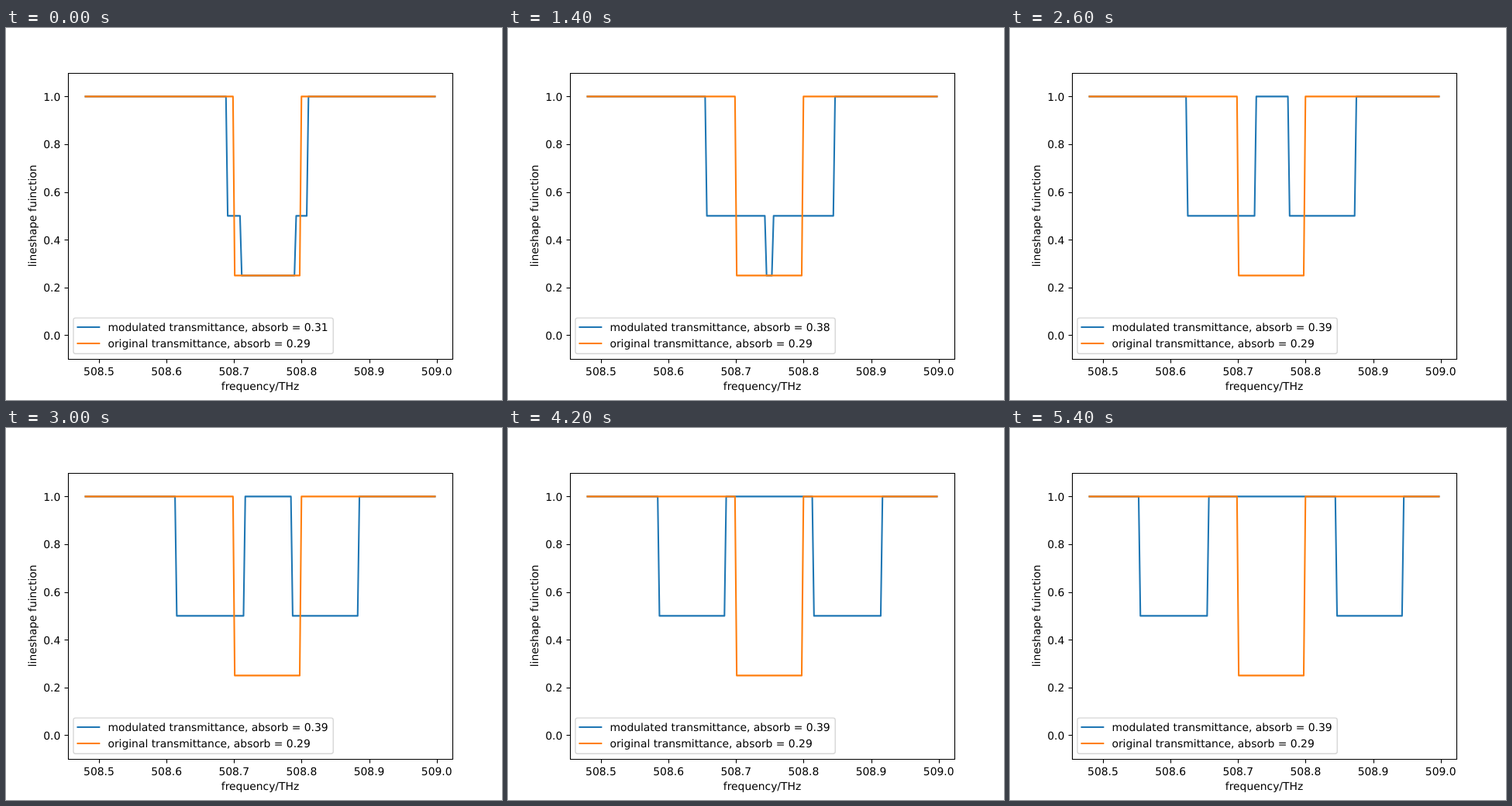
These frames come from a looping animation (640x480 px, 5600 ms). An HTML page:

```html
<!DOCTYPE html>
<html lang="en">
<head>
<meta charset="utf-8">
<title>Modulated transmittance</title>
<style>
  html, body { margin: 0; width: 100%; height: 100%; overflow: hidden; background: #fff; }
  svg { display: block; }
  text { font: 13.889px "DejaVu Sans", sans-serif; fill: #000; text-rendering: geometricPrecision; white-space: pre; }
  .axis { fill: none; stroke: #000; stroke-width: 1.111; }
  .curve { fill: none; stroke-width: 2.083; stroke-linecap: square; stroke-linejoin: round; }
</style>
</head>
<body>
<svg id="plot" width="640" height="480" viewBox="0 0 640 480"></svg>
<script>
const SVG_NS = "http://www.w3.org/2000/svg";
const plot = document.getElementById("plot");
const BLUE = "#1f77b4", ORANGE = "#ff7f0e";

// Sampled frequency axis: 200 points, 0.0026 THz apart
const POINTS = 200, STEP = 0.0026, START = 508.48;
const LEFT = 102.545, DX = 450.909 / (POINTS - 1);
const BAND_START = 84.42, BAND_END = 122.885;
const FRAME_MS = 200, FRAMES = 28;

const xOf = freq => LEFT + (freq - START) / STEP * DX;
const yOf = value => 396.4 - 308 * value;

function add(tag, attrs, content = "") {
  const node = document.createElementNS(SVG_NS, tag);
  for (const key in attrs) node.setAttribute(key, attrs[key]);
  node.textContent = content;
  return plot.appendChild(node);
}

const label = (x, y, content, anchor = "middle", extra = {}) =>
  add("text", { x, y, "text-anchor": anchor, ...extra }, content);
const curve = (stroke, d = "") => add("path", { class: "curve", stroke, d });
const axis = d => add("path", { class: "axis", d });

// Absorption at every sample, from two half-strength bands moved apart by `shift` samples
function absorption(shift) {
  const inBand = i => i >= BAND_START && i <= BAND_END;
  return Array.from({ length: POINTS }, (_, i) => {
    const hits = inBand(i + shift) + inBand(i - shift);
    return [0, 0.5, 0.75][hits];
  });
}

const pathOf = values => "M" + values
  .map((v, i) => `${(LEFT + i * DX).toFixed(2)} ${yOf(1 - v).toFixed(2)}`)
  .join("L");

const caption = (name, values) => {
  const percent = Math.round(values.reduce((sum, v) => sum + v, 0));
  return `${name} transmittance, absorb = ${(percent / 100).toFixed(2)}`;
};

const still = absorption(0);
const movingCurve = curve(BLUE);
curve(ORANGE, pathOf(still));

axis("M80.5 58.5H576.5V427.5H80.5Z");
for (let k = 0; k < 6; k++) {
  const freq = 508.5 + k / 10, x = xOf(freq);
  axis(`M${Math.round(x) + 0.5} 427.5v5`);
  label(x, 448, freq.toFixed(1));

  const value = k / 5, y = yOf(value);
  axis(`M80.5 ${Math.round(y) + 0.5}h-5`);
  label(70.3, Math.round(y + 5.3), value.toFixed(1), "end");
}
label(328, 467, "frequency/THz");
label(0, 0, "lineshape fuinction", "middle", { transform: "translate(39 242.4) rotate(-90)" });

add("rect", {
  x: 86.94, y: 374.1, width: 335.3, height: 46.2, rx: 2.78,
  fill: "#fff", stroke: "#ccc", "stroke-width": 1.389, opacity: 0.8
});
curve(BLUE, "M92.5 386H120.3");
curve(ORANGE, "M92.5 407H120.3");
const movingCaption = label(131.4, 391, "", "start");
label(131.4, 412, caption("original", still), "start");

let shown = -1;
function draw(now) {
  const frame = Math.floor(now / FRAME_MS) % FRAMES;
  if (frame !== shown) {
    shown = frame;
    const values = absorption((0.01 + 0.005 * frame) / STEP);
    movingCurve.setAttribute("d", pathOf(values));
    movingCaption.textContent = caption("modulated", values);
  }
}

const begin = performance.now();
function tick() {
  draw(performance.now() - begin);
  requestAnimationFrame(tick);
}
tick();
</script>
</body>
</html>
```
